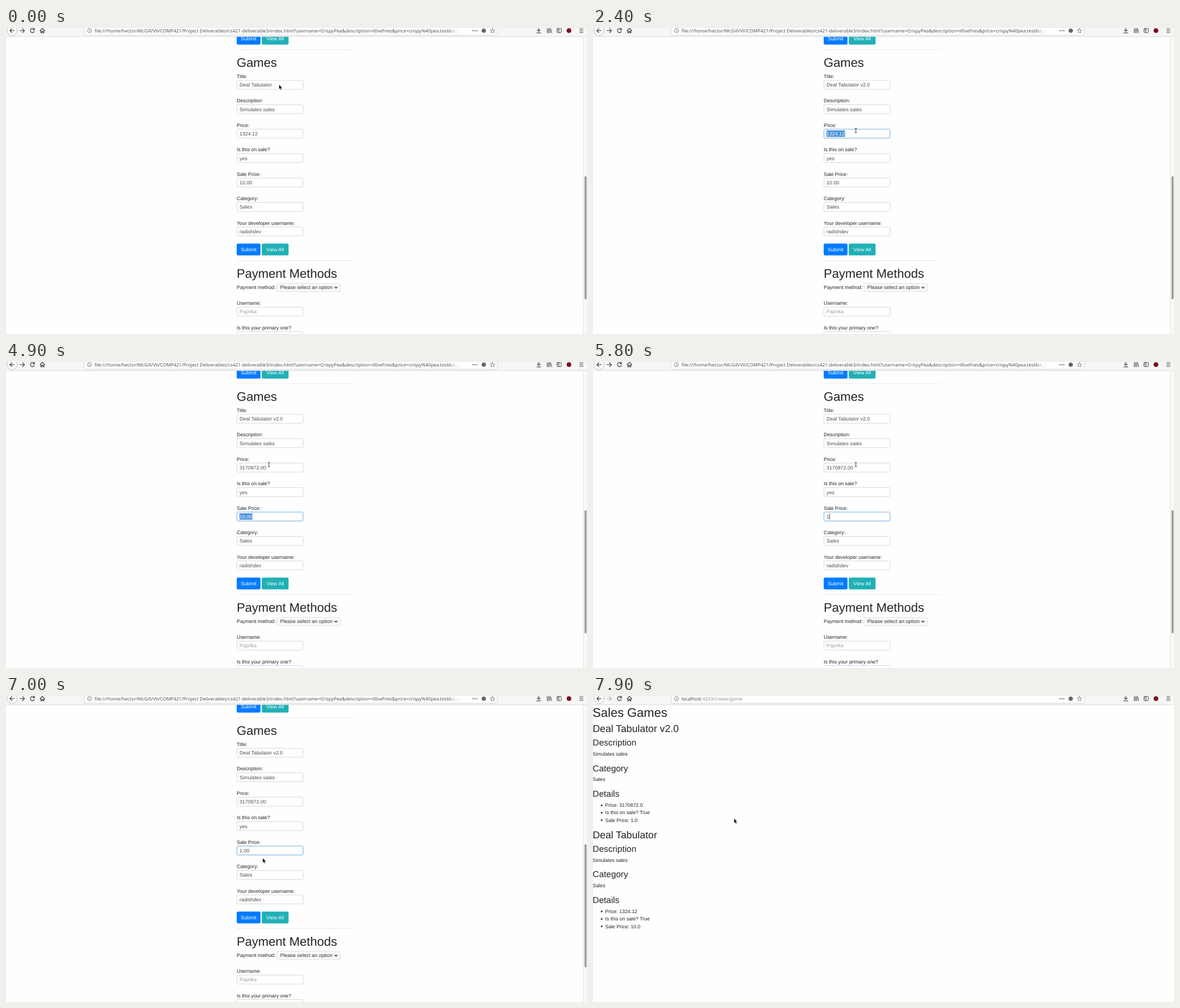
An HTML page for the animation above (8 s loop, 1030 by 544 pixels).

```html
<!DOCTYPE html>
<html lang="en">
<head>
<meta charset="utf-8">
<title>Game form</title>
<style>
  html, body { margin: 0; width: 100%; height: 100%; overflow: hidden; background: #fefefe; }
  svg { display: block; }
  text { font-family: "Liberation Sans", Arial, sans-serif; fill: #212529; white-space: pre; text-rendering: geometricPrecision; }
  .ui { font-family: "Open Sans", "Noto Sans", sans-serif; }
</style>
</head>
<body>
<svg id="stage" width="1030" height="544" viewBox="0 0 1030 544">
  <defs>
    <linearGradient id="fade"><stop offset="0" stop-color="#fff" stop-opacity="0"/><stop offset="1" stop-color="#fff"/></linearGradient>
    <clipPath id="urlClip"><rect x="150" y="0" width="656" height="14"/></clipPath>
    <filter id="soft" x="-10%" y="-50%" width="120%" height="200%"><feGaussianBlur stdDeviation="1.5"/></filter>
  </defs>
  <rect width="1030" height="544" fill="#fefefe"/>
  <g id="form"></g>
  <g id="result"></g>
  <g id="popup"></g>
  <g id="toolbar">
    <rect width="1030" height="15" fill="#f5f6f5"/>
    <path d="M0 15.4H1030" stroke="#d2d3d2" stroke-width=".8"/>
    <rect x="138.5" y="-8" width="732.5" height="20.8" rx="2" fill="#fff" stroke="#cfcfcf" stroke-width=".8"/>
    <g fill="none" stroke="#4a4a4a" stroke-width="1.3" stroke-linecap="round" stroke-linejoin="round">
      <circle cx="10.8" cy="4.5" r="9" fill="#fdfdfd" stroke="#b5b5b5" stroke-width=".9"/>
      <path d="M14.6 4.7H7M10.3 1.2L6.8 4.7L10.3 8.2"/>
      <path id="forward" d="M25 4.7H32.6M29.3 1.2L32.8 4.7L29.3 8.2"/>
      <path d="M50 2.4A3.7 3.7 0 1 0 50.4 6M50.5 .5V3H48"/>
      <path d="M60.3 4.8L64.5 .8L68.7 4.8M61.7 4.6V8.6H63.5V6H65.5V8.6H67.3V4.6"/>
      <g stroke-width=".8" stroke="#666">
        <circle cx="148" cy="4.8" r="3.6"/><path d="M148 4.5V6.7M148 2.8V3"/>
        <path d="M862.5 .7L863.7 3.5L866.7 3.7L864.4 5.6L865.2 8.6L862.5 7L859.8 8.6L860.6 5.6L858.3 3.7L861.3 3.5Z"/>
      </g>
      <path d="M944.5 0V5.8M941.8 3.4L944.5 6L947.2 3.4M941 8.6H948" stroke-width="1.2"/>
      <path d="M959.6 1V8.5M961.8 1V8.5M964 1V8.5M965.3 1.2L967.4 8.5" stroke-width="1.1"/>
      <rect x="976.8" y="1" width="7.6" height="7.2" rx="1" stroke-width="1"/>
      <path d="M980.2 1V8M978 3H979M978 5H979" stroke-width=".9"/>
      <path d="M1017 1.7H1023M1017 4.7H1023M1017 7.7H1023" stroke-width="1.1"/>
    </g>
    <g fill="#666">
      <circle cx="827.8" cy="4.8" r="1.1"/><circle cx="831.2" cy="4.8" r="1.1"/><circle cx="834.6" cy="4.8" r="1.1"/>
      <circle cx="847" cy="4.8" r="3.8"/>
    </g>
    <circle cx="998" cy="4.7" r="4.1" fill="#7c1022"/>
    <g id="url" clip-path="url(#urlClip)"></g>
    <rect id="urlFade" x="782" y="0" width="24" height="12" fill="url(#fade)"/>
  </g>
  <g id="status">
    <rect x="-1" y="533.8" width="180" height="12" rx="1.5" fill="#f3f4f3" stroke="#cdcdcd" stroke-width=".8"/>
  </g>
  <g id="cursor">
    <path id="arrow" d="M0 0V8.6L2 6.8L3.4 9.8L4.9 9.1L3.5 6.2H6Z" fill="#000" stroke="#fff" stroke-width=".6"/>
    <path id="beam" d="M-1.9 -3.9Q-.2 -3.9 0 -3.2Q.2 -3.9 1.9 -3.9M0 -3.2V3.2M-1.9 3.9Q-.2 3.9 0 3.2Q.2 3.9 1.9 3.9" fill="none" stroke="#222" stroke-width=".9"/>
    <path id="hand" d="M-.9 .4Q0 -.6 .9 .4V3L4.2 3.9Q5 4.3 4.7 6L4 9.4H-1.2L-3.6 5.8Q-3.4 4.5 -2 5.3L-.9 6.2Z" fill="#000" stroke="#fff" stroke-width=".5"/>
  </g>
</svg>
<script>
const $ = id => document.getElementById(id);
const LOOP = 8000, LEFT = 409, PITCH = 43.45, BODY = 8.84, FIELD = 8.95;

function add(parent, tag, attrs, content) {
  const node = document.createElementNS("http://www.w3.org/2000/svg", tag);
  for (const key in attrs) node.setAttribute(key, attrs[key]);
  if (content !== undefined) node.textContent = content;
  parent.appendChild(node);
  return node;
}
const write = (parent, x, y, size, content, more) =>
  add(parent, "text", { x, y, "font-size": size, ...more }, content);
const box = (parent, x, y, width, height, more) =>
  add(parent, "rect", { x, y, width, height, ...more });
const show = (node, on) => { node.style.display = on ? "" : "none"; };

// Form page
const form = $("form");

function button(x, y, width, label, fill) {
  const rect = box(form, x, y, width, 21, { rx: 2.2, fill });
  write(form, x + width / 2, y + 14, FIELD, label, { "text-anchor": "middle", style: "fill:#fff" });
  return rect;
}
function buttons(y) {
  const submit = button(LEFT, y, 42.2, "Submit", "#007bff");
  button(453.4, y, 47.5, "View All", "#20b0b6");
  add(form, "path", { d: `M${LEFT} ${y + 30.3}H615`, stroke: "#e4e4e4", "stroke-width": .8 });
  return submit;
}
function field(label, y, value, color = "#495057") {
  write(form, LEFT, y, BODY, label);
  const frame = box(form, 409.4, y + 4, 117.2, 15.9, { rx: 1.8, fill: "#fff", stroke: "#ced4da", "stroke-width": .9 });
  const mark = box(form, 414, y + 6.2, 0, 11.4, { fill: "#4a90d9" });
  const text = write(form, 414, y + 15.2, FIELD, value, { style: `fill:${color}` });
  const caret = box(form, 414, y + 6.6, .8, 10.6, { fill: "#222" });
  show(caret, false);
  return { frame, mark, text, caret, color };
}

buttons(8.4);
write(form, LEFT, 69, 22.1, "Games");
const labels = {
  title: "Title:", about: "Description:", price: "Price:", onSale: "Is this on sale?",
  salePrice: "Sale Price:", category: "Category:", dev: "Your developer username:"
};
const fields = {};
Object.keys(labels).forEach((key, i) => {
  fields[key] = field(labels[key], 89 + i * PITCH, "");
});
const submit = buttons(383.2);
write(form, LEFT, 444, 22.1, "Payment Methods");
write(form, LEFT, 464.3, BODY, "Payment method:");
box(form, 480.4, 454, 112.4, 14.6, { rx: 1.5, fill: "#f9f9fa", stroke: "#d5d7da", "stroke-width": .8 });
write(form, 486, 464.3, 9, "Please select an option", { style: "fill:#333" });
add(form, "path", { d: "M582.6 460L585 462.4L587.4 460", fill: "none", stroke: "#333", "stroke-width": 1.4 });
field("Username:", 492.2, "Paprika", "#9a9fa4");
field("Is this your primary one?", 492.2 + PITCH, "");
box(form, 1023, 16, 7, 528, { fill: "#f8f8f8" });
add(form, "path", { d: "M1023.4 16V544", stroke: "#dedede", "stroke-width": .8 });
box(form, 1025.6, 263.5, 3.6, 219, { rx: 1.8, fill: "#9b9b9b" });

// Result page
const result = $("result");
function game(dy, name, price, salePrice) {
  const line = (y, size, content, x = -.5) => write(result, x, y + dy, size, content);
  line(64.2, 17.75, name);
  [["Description", "Simulates sales"], ["Category", "Sales"], ["Details"]].forEach(([head, body], i) => {
    line(88.2 + i * 45.3, 15.46, head);
    if (body) line(106.3 + i * 45.1, BODY, body);
  });
  [`Price: ${price}`, "Is this on sale? True", `Sale Price: ${salePrice}`].forEach((item, i) => {
    const y = 197.1 + i * 13.3;
    line(y, BODY, item, 21.6);
    add(result, "circle", { cx: 15.4, cy: y + dy - 2.9, r: 1.5, fill: "#212529" });
  });
}
write(result, -.8, 37.3, 22.1, "Sales Games");
game(0, "Deal Tabulator v2.0", "3170872.0", "1.0");
game(188.8, "Deal Tabulator", "1324.12", "10.0");

// Browser texts
const urlText = (content, color) => write($("url"), 157, 7.9, 8.3, content, { class: "ui", style: `fill:${color}` });
const formUrl = urlText("file:///home/hector/McGill/VII/COMP421/Project Deliverables/cs421-deliverable3/index.html?username=CrispyPea&description=il0vefries&price=crispy%40pea.test&is_on_sale=yes", "#444");
const resultUrl = urlText("localhost", "#333");
add(resultUrl, "tspan", { fill: "#888", style: "fill:#888" }, ":4293/create/game");
write($("status"), 1.6, 542.6, 8.2, "Looking up localhost…", { class: "ui", style: "fill:#333" });

const popup = $("popup");
const popupShadow = box(popup, 408, 284.5, 119, 0, { fill: "#000", opacity: .3, filter: "url(#soft)" });
const popupBox = box(popup, 409, 283.6, 117, 0, { fill: "#fff", stroke: "#ddd", "stroke-width": .5 });
const popupRows = [0, 1, 2, 3].map(i => write(popup, 412.6, 292.8 + i * 11, 7.6, "", { class: "ui" }));

// Each step holds from its time on and changes only the named parts.
const steps = [
  [0, { title: "Deal Tabulator", about: "Simulates sales", price: "1324.12", onSale: "yes", salePrice: "10.00",
        category: "Sales", dev: "radishdev", focus: "", glow: 1, selected: false, caret: false,
        options: [], button: "", page: "form", status: false, cursor: ["arrow", 484, 100.5] }],
  [300, { focus: "title", glow: .5, caret: true, cursor: ["beam", 486, 101] }],
  [400, { glow: 1 }],
  [700, { title: "Deal Tabulator ", cursor: ["arrow", 562.5, 109.5] }],
  [900, { title: "Deal Tabulator v2" }],
  [1100, { title: "Deal Tabulator v2.0" }],
  [1700, { caret: false, cursor: ["arrow", 554.5, 116.5] }],
  [1900, { cursor: ["arrow", 510, 156] }],
  [2000, { focus: "price", glow: .5, caret: true, cursor: ["beam", 466, 182.4] }],
  [2100, { glow: 1 }],
  [2400, { selected: true, caret: false }],
  [2600, { selected: false, caret: true, price: "" }],
  [3000, { price: "3" }],
  [3100, { price: "31" }],
  [3200, { price: "317" }],
  [3300, { price: "31708" }],
  [3500, { price: "3170872" }],
  [3800, { price: "3170872." }],
  [4000, { price: "3170872.0" }],
  [4300, { price: "3170872.00" }],
  [4500, { focus: "onSale", selected: true, caret: false }],
  [4900, { focus: "salePrice" }],
  [5800, { selected: false, caret: true, salePrice: "1" }],
  [5900, { options: ["10.00", "11.0", "10", "100"] }],
  [6000, { cursor: ["arrow", 465, 181.5] }],
  [6100, { salePrice: "1.", options: ["11.0"] }],
  [6200, { salePrice: "1.0" }],
  [6500, { salePrice: "1.00", options: [], cursor: ["beam", 466, 182.4] }],
  [6700, { cursor: ["beam", 465, 189] }],
  [6800, { cursor: ["arrow", 463, 208] }],
  [6900, { cursor: ["arrow", 460, 244] }],
  [7000, { caret: false, cursor: ["arrow", 455, 288] }],
  [7100, { cursor: ["arrow", 449, 331] }],
  [7200, { cursor: ["beam", 443, 364] }],
  [7300, { button: "hover", cursor: ["hand", 438, 388] }],
  [7400, { cursor: ["hand", 437, 399.5] }],
  [7500, { focus: "", button: "focus" }],
  [7600, { status: true }],
  [7700, { page: "result", status: false, cursor: ["arrow", 437, 399.8] }],
  [7900, { cursor: ["arrow", 250, 217.6] }]
];

function render(time) {
  const state = {};
  for (const [start, change] of steps) if (start <= time) Object.assign(state, change);

  for (const key in fields) {
    const { frame, mark, text, caret, color } = fields[key];
    const focused = state.focus === key, marked = focused && state.selected;
    text.textContent = state[key];
    text.style.fill = marked ? "#fff" : color;
    frame.setAttribute("stroke", !focused ? "#ced4da" : state.glow < 1 ? "#9cbedb" : "#67a3d6");
    show(mark, marked);
    show(caret, focused && state.caret);
    if (focused && state.page === "form") {
      const width = state[key] ? text.getComputedTextLength() : 0;
      mark.setAttribute("width", width + .4);
      caret.setAttribute("x", 414.1 + width);
    }
  }

  submit.setAttribute("fill", state.button ? "#0069d9" : "#007bff");
  submit.setAttribute("stroke", state.button === "focus" ? "rgba(80,160,250,.75)" : "none");
  submit.setAttribute("stroke-width", 1.6);

  const count = state.options.length;
  show(popup, count);
  popupBox.setAttribute("height", count * 11 + 1.6);
  popupShadow.setAttribute("height", count * 11 + 2.5);
  popupRows.forEach((row, i) => { row.textContent = state.options[i] || ""; });

  const onForm = state.page === "form";
  show(form, onForm);
  show(result, !onForm);
  show(formUrl, onForm);
  show(resultUrl, !onForm);
  show($("urlFade"), onForm);
  $("forward").setAttribute("stroke", onForm ? "#555" : "#b8b8b8");
  show($("status"), state.status);

  const [shape, x, y] = state.cursor;
  for (const id of ["arrow", "beam", "hand"]) show($(id), id === shape);
  $("cursor").setAttribute("transform", `translate(${x} ${y})`);
}

const origin = performance.now();
function tick() {
  render((performance.now() - origin) % LOOP);
  requestAnimationFrame(tick);
}
tick();
</script>
</body>
</html>
```
